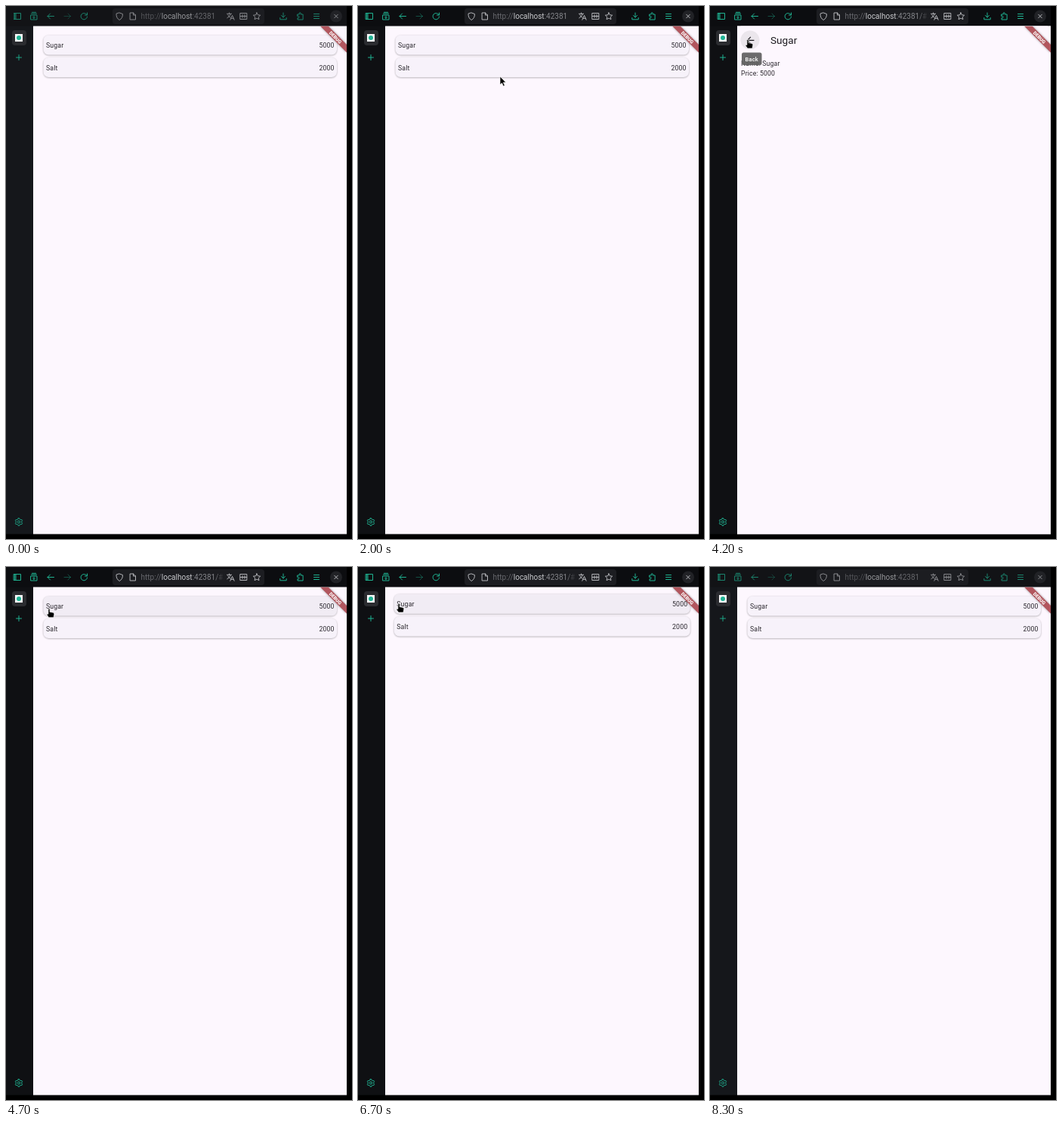
An HTML page that plays this animation: 458 by 704 pixels, repeating every 9.3 s.

```html
<!DOCTYPE html>
<html lang="en">
<head>
<meta charset="utf-8">
<title>Product list</title>
<style>
html, body { margin: 0; width: 100%; height: 100%; overflow: hidden; background: #000; }
svg { display: block; width: 100%; height: 100%; }
text { font-family: Roboto, sans-serif; white-space: pre; }
.line { fill: none; stroke: #1fb291; stroke-width: 1; stroke-linecap: round; stroke-linejoin: round; }
.grey { stroke: #b4b5b9; }
.body { font-size: 8.68px; letter-spacing: .155px; fill: #2b282e; }
.title { font-size: 13.64px; fill: #1d1b20; }
</style>
</head>
<body>
<svg viewBox="0 0 458 704">
  <defs>
    <clipPath id="view"><rect x="36" y="26.5" width="415" height="671"/></clipPath>
    <linearGradient id="fade" gradientUnits="userSpaceOnUse" x1="274" x2="289" y1="0" y2="0">
      <stop stop-color="#8b8c91"/><stop offset="1" stop-color="#8b8c91" stop-opacity="0"/>
    </linearGradient>
    <filter id="soft" x="-10%" y="-40%" width="120%" height="180%"><feGaussianBlur stdDeviation="1"/></filter>
    <filter id="glow" x="-30%" y="-30%" width="160%" height="160%"><feGaussianBlur stdDeviation="1.8"/></filter>
  </defs>

  <rect id="chrome" width="451" height="697.5"/>
  <rect id="bar" width="451" height="26.5"/>
  <rect x="141" y="3" width="201" height="21" rx="4" fill="#1c1d21"/>
  <circle cx="437" cy="13.5" r="8" fill="#212226"/>
  <rect x="8" y="32" width="19" height="20" rx="4" fill="#2b2c30"/>
  <rect x="12" y="37" width="10" height="10" fill="#f4f8f8"/>
  <circle cx="17" cy="42" r="3" fill="#20b394"/>

  <g id="tools">
    <g class="line">
      <path d="M10.5 9.5h9v8h-9zM13 9.5v8M11.7 9.5v8"/>
      <path d="M33 12h8v6h-8zM33.5 10h7M34.5 8.3h5M37 13.3v3M35.6 15l1.4 1.4 1.4-1.4"/>
      <path d="M63.5 13.5h-8.5m3.5-3.5l-3.500 3.500 3.500 3.500"/>
      <path d="M77 13.500h8.500m-3.500-3.500l3.500 3.500-3.500 3.500" opacity=".4"/>
      <path d="M106.800 11.300A4.200 4.200 0 1 0 107.500 14M107.500 9v3h-3"/>
      <path d="M367 9v6m-2.500-2.500l2.500 2.500 2.500-2.500M362.800 15.500v2.300h8.400v-2.300"/>
      <path d="M386 11h2.300q-.8-2.300.9-2.300t.9 2.300h3v7h-7.100v-2.300q2.200.6 2.200-1.200t-2.200-1.200z"/>
      <path d="M407.500 10.500h7M407.500 13.500h7M407.500 16.500h7"/>
    </g>
    <g class="line grey" stroke-width=".9">
      <path d="M150.200 9l4.200 1.500q.3 5.500-4.200 8-4.500-2.500-4.200-8z"/>
      <path d="M164.500 9h4l3 3v6h-7zM168.500 9v3h3"/>
      <path d="M292.500 10.300h6M295.500 9v1.300M297.600 10.300q-1.300 4-4.800 5.500M293.800 11.800q1.200 2.500 3 3.300M296.800 18.300l2.700-6 2.600 6M297.700 16.300h3.600"/>
      <path d="M310.200 9.500h8.600v8h-8.600zM310.200 13.500h8.600M313 11.500v4M316 11.500v4"/>
      <path d="M332 8.800l1.400 3 3.300.4-2.400 2.200.6 3.300-2.900-1.600-2.900 1.600.6-3.300-2.400-2.200 3.300-.4z"/>
      <path d="M434.700 11.200l4.600 4.600m0-4.600l-4.600 4.600"/>
    </g>
    <text x="178.500" y="17" font-size="10" fill="#68696e">http://<tspan fill="#c9cacd">localhost</tspan><tspan fill="#85868b">:42381</tspan><tspan id="route" fill="url(#fade)">/#/</tspan></text>
  </g>
  <g id="side" class="line">
    <path d="M13.500 68h7M17 64.500v7"/>
    <path id="gear"/>
    <circle cx="17" cy="681.500" r="1.600"/>
  </g>

  <g clip-path="url(#view)">
    <rect x="36" y="26" width="415" height="672" fill="#fdf7fe"/>
    <g id="list"></g>
    <g id="detail">
      <rect x="-50" y="-80" width="600" height="900" fill="#fdf7fe"/>
      <circle id="halo" cx="53" cy="45" r="12.500" fill="#1d1b20" opacity=".08"/>
      <path transform="translate(46 38) scale(.62)" fill="#1d1b20" d="M20 11H7.830l5.590-5.590L12 4l-8 8 8 8 1.410-1.410L7.830 13H20z"/>
      <text id="title" class="title" x="80" y="49.800"></text>
      <text id="name" class="body" x="41" y="79.200"></text>
      <text id="price" class="body" x="41" y="92.300"></text>
    </g>
    <g id="tip">
      <rect x="42" y="61.500" width="26.500" height="16.500" rx="2.500" fill="#616161" opacity=".93"/>
      <text x="55.200" y="72.500" text-anchor="middle" font-size="7.500" font-weight="500" letter-spacing=".2" fill="#fff">Back</text>
    </g>
    <path d="M416 26.500h10.500L451 51v10.500z" fill="#000" opacity=".4" filter="url(#glow)"/>
    <path d="M416 26.500h10.500L451 51v10.500z" fill="#b2565e"/>
    <text transform="translate(436 41.500) rotate(45)" y="2.200" text-anchor="middle" font-size="6.300" font-weight="900" fill="#fff">DEBUG</text>
  </g>

  <g id="cursor" stroke="#fff" stroke-width=".7" stroke-linejoin="round">
    <path id="arrow" d="M0 0v11l2.500-2.200 1.900 4.200 1.900-.9-1.900-4.100h3.400z"/>
    <path id="hand" d="M-1.100 1Q0-.8 1.100 1v3.600l4.400.8q1.600.4 1.300 2.300l-.8 4.300H-.4L-3 8.200q-.4-1.600 1.900-.8z"/>
  </g>
</svg>
<script>
const LOOP = 9300, STEP = 100, ZOOM = 300;
const $ = id => document.getElementById(id);
const clamp = v => Math.max(0, Math.min(1, v));
const ramp = (t, from, to) => clamp((t - from) / (to - from));
const mix = (a, b, p) => a + (b - a) * p;
const grey = (a, b, p) => `rgb(${a.map((v, i) => Math.round(mix(v, b[i], p)))})`;
const show = (id, on) => $(id).setAttribute('opacity', +on);

const items = [['Sugar', 5000], ['Salt', 2000]];
const cardTop = i => 38.5 + i * 29.5;
$('list').innerHTML = items.map(([name, price], i) => {
  const y = cardTop(i);
  const box = dy => `x="49.500" y="${y + dy}" width="388.500" height="26" rx="7"`;
  return `<rect ${box(.7)} fill="#000" opacity=".3" filter="url(#soft)"/>
    <rect ${box(0)} fill="#f7f2fa"/>
    <rect id="hover${i}" ${box(0)} fill="#1d1b20"/>
    <text class="body" x="53" y="${y + 16.6}">${name}</text>
    <text class="body" x="434.600" y="${y + 16.6}" text-anchor="end">${price}</text>`;
}).join('');

// Six-toothed settings wheel
$('gear').setAttribute('d', 'M' + Array.from({ length: 24 }, (_, i) => {
  const a = (i - .5) * Math.PI / 12, r = i % 4 < 2 ? 5 : 3.7;
  return `${(17 + r * Math.sin(a)).toFixed(2)} ${(681.5 - r * Math.cos(a)).toFixed(2)}`;
}).join('L') + 'Z');

// Time, x, y of the pointer
const track = [
  [1600, 215, 334], [1700, 212, 320], [2000, 188, 93], [2200, 188, 78], [2500, 188, 55],
  [3300, 188, 55], [3800, 52, 45], [4200, 50, 44], [4600, 50, 44], [5000, 78, 87],
  [5300, 78, 90], [5700, 78, 90], [6100, 56, 50], [6300, 54, 48], [6700, 54, 48],
  [7200, 135, 247], [7500, 135, 247]
];

function pointer(t) {
  const i = track.findIndex(k => k[0] > t);
  if (i < 1) return null;
  const [a, b] = [track[i - 1], track[i]], p = ramp(t, a[0], b[0]);
  return { x: mix(a[1], b[1], p), y: mix(a[2], b[2], p) };
}

// Page visits: opened, closed, item
const visits = [[2990, 4435, 0], [5390, 6535, 1]];

function zoom(id, s) {
  $(id).setAttribute('transform', `translate(243.500 362) scale(${s}) translate(-243.500 -362)`);
}

function render(t) {
  const focus = ramp(t, 600, 1100) * (1 - ramp(t, 7800, 8300));
  $('chrome').setAttribute('fill', grey([21, 23, 27], [15, 16, 19], focus));
  $('bar').setAttribute('fill', grey([18, 19, 22], [12, 13, 16], focus));
  $('tools').setAttribute('opacity', mix(.7, 1, focus));
  $('side').setAttribute('opacity', mix(.9, 1, focus));

  let open = false, listScale = 1, pageScale = 1, alpha = 0;
  for (const [start, end, item] of visits) {
    if (t < start || t > end + ZOOM) continue;
    const [name, price] = items[item];
    $('title').textContent = name;
    $('name').textContent = 'Name: ' + name;
    $('price').textContent = 'Price: ' + price;
    open = t < end;
    const p = ramp(t, open ? start : end, (open ? start : end) + ZOOM);
    const rest = (1 - p) ** 3;
    if (open) {
      pageScale = 1 - .15 * rest;
      listScale = 1 + .05 * (1 - rest);
      alpha = ramp(p, .05, .35);
    } else {
      pageScale = 1 - .1 * (1 - rest);
      listScale = 1 + .1 * rest;
      alpha = 1 - ramp(p, 0, .35);
    }
  }
  zoom('list', listScale);
  zoom('detail', pageScale);
  $('detail').setAttribute('opacity', alpha);
  show('route', visits.some(([start, end]) => t >= start && t < end + 350));

  const at = pointer(t);
  const onBack = !!at && open && Math.hypot(at.x - 53, at.y - 45) < 12.5;
  const card = at && !open ? items.findIndex((_, i) => at.y > cardTop(i) && at.y < cardTop(i) + 24.5) : -1;
  items.forEach((_, i) => $('hover' + i).setAttribute('opacity', i === card ? .025 : 0));
  $('halo').setAttribute('opacity', onBack ? .08 : 0);
  show('tip', onBack && t >= 3900 && t < 4500);
  show('cursor', !!at);
  if (at) $('cursor').setAttribute('transform', `translate(${at.x} ${at.y})`);
  const hand = onBack || card >= 0;
  show('hand', hand);
  show('arrow', !hand);
}

const begin = performance.now();
function tick() {
  const t = Math.max(0, performance.now() - begin) % LOOP;
  render(Math.floor(t / STEP) * STEP);
  requestAnimationFrame(tick);
}
tick();
</script>
</body>
</html>
```
